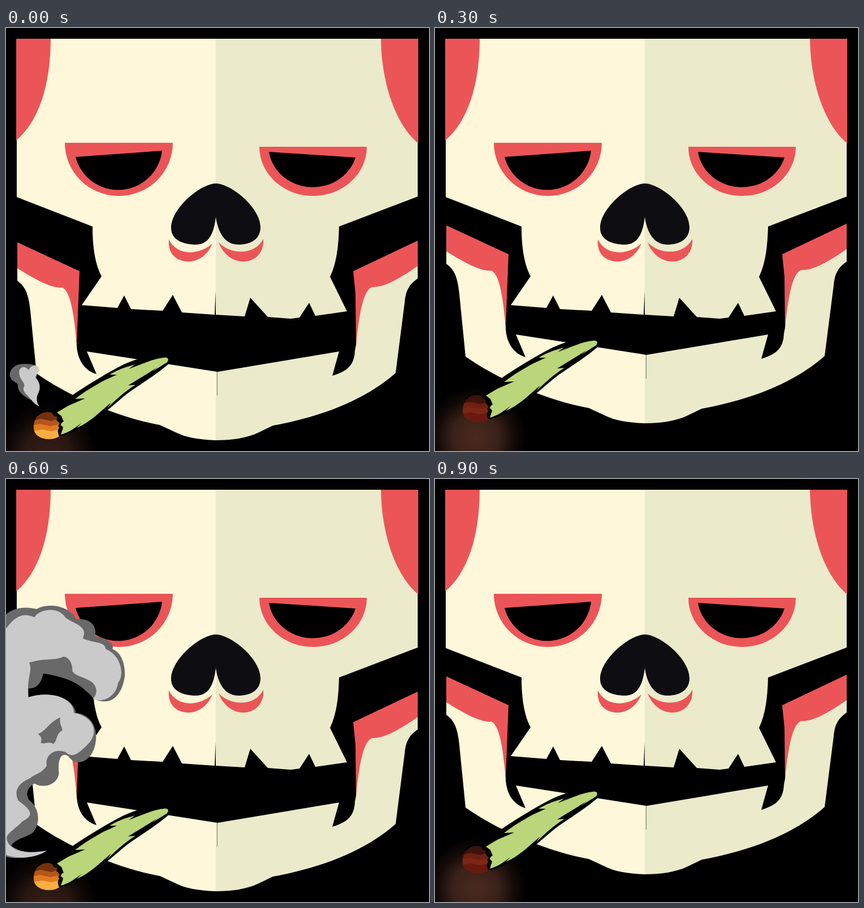
An HTML page that plays this animation: 748 by 748 pixels, repeating every 1000 ms.

```html
<!DOCTYPE html>
<html lang="en">
<head>
<meta charset="utf-8">
<title>Smoking skull</title>
<style>
  html, body { margin: 0; width: 100%; height: 100%; overflow: hidden; background: #000; }
  svg { display: block; width: 100%; height: 100%; }
  .cream { fill: url(#bone); }
  .red { fill: #eb5558; }
  .dark { fill: #696969; }
  .light { fill: #cacaca; }
</style>
</head>
<body>
<svg viewBox="0 0 748 748">
  <defs>
    <linearGradient id="bone" gradientUnits="userSpaceOnUse" x1="0" y1="0" x2="742" y2="0">
      <stop offset=".5" stop-color="#fef7d9"/>
      <stop offset=".5" stop-color="#ebeaca"/>
    </linearGradient>
    <radialGradient id="glow">
      <stop offset="0" stop-color="#4a2a20"/>
      <stop offset=".45" stop-color="#3a2119"/>
      <stop offset=".75" stop-color="#140b08"/>
      <stop offset="1" stop-color="#000"/>
    </radialGradient>
    <clipPath id="tip">
      <path d="M57 685C64 677 77 675 85 681L93 687 91 695 97 702 92 710 94 722C84 729 64 729 54 719 46 711 48 694 57 685Z"/>
    </clipPath>
    <g id="plume">
      <path class="dark" d="M0 311C12 300 30 299 45 303 60 294 92 296 104 318 122 316 135 326 131 343 146 346 160 352 157 362 172 368 176 388 175 402 172 425 160 440 145 439 125 438 128 430 118 424 105 410 82 402 55 398 52 412 46 420 33 420L33 433C70 422 100 436 103 456 125 458 136 478 132 500 128 526 105 538 92 520 80 512 76 528 78 545 76 562 55 568 42 560 30 566 27 580 38 588 50 600 50 620 40 632 30 640 12 642 8 652 25 664 45 664 60 659 45 670 15 672 0 668Z"/>
      <path class="light" d="M0 332C10 318 22 306 42 315 50 302 78 299 88 316 100 325 122 328 113 346 128 354 146 350 147 362 168 370 176 398 165 412 162 434 140 442 128 435 138 425 132 412 122 408 112 402 104 402 98 395 98 385 95 375 85 373 70 380 60 374 34 382 40 392 30 405 33 433 70 422 100 436 100 456 130 462 138 485 120 503 108 514 100 524 88 514 70 507 57 520 60 534 52 546 42 546 36 552 22 558 10 568 18 585 38 600 42 606 24 616 14 628 -3 634 2 645 8 660 30 664 60 659 45 670 15 672 0 665Z"/>
      <path class="dark" d="M47 487C58 484 66 467 80 463 78 472 83 476 83 482 74 486 76 496 70 502 63 497 58 503 51 500 54 494 51 490 47 487Z"/>
    </g>
  </defs>

  <rect width="748" height="748"/>

  <g id="jaw">
    <circle id="halo" cx="72" cy="754" r="90" fill="url(#glow)"/>
    <path class="cream" d="M20 395L118 440 125 560C126 585 137 605 160 612L143 572 374 608 589 572 577 615C602 607 616 598 617 570L619 560 624 440 728 395V443C712 454 707 465 705 485L689 610C640 653 570 685 472 703L445 716C425 725 400 729 371 729 340 728 315 723 300 715L272 702C200 689 112 652 54 611L43 500C40 470 34 457 20 447Z"/>
    <path d="M373.500 608V650" stroke="#77755f" fill="none"/>
    <path class="red" d="M20 379L130 430 125 560C121 515 116 468 100 459 78 461 45 440 20 425Z"/>
    <path class="red" d="M728 376L614 430 618 470 619 560C623 520 630 462 648 458 670 460 706 436 728 421Z"/>

    <path d="M54 685C60 675 70 676 80 675L100 662 122 646C148 629 180 609 208 595 236 583 262 576 282 576 293 576 295 585 290 592 272 608 250 622 228 637 207 650 188 671 166 686 142 701 120 717 96 722Z"/>
    <path fill="#bad57a" d="M90 680L110 668 140 655 122 656C140 642 158 632 172 624L196 613 183 613C197 605 207 601 218 598L228 595 217 603C238 595 262 584 279 583 288 582 288 587 285 591L258 608 268 600 216 632 229 631C208 644 196 656 179 672L186 662C166 679 149 697 125 707L134 698C124 706 110 716 97 719L101 706 95 700 102 696 98 686Z"/>
    <g clip-path="url(#tip)" id="ember">
      <rect x="45" y="670" width="60" height="60"/>
      <path d="M45 695L62 691 80 695 105 688V730H45Z"/>
      <path d="M45 703L60 700 78 704 105 699V730H45Z"/>
      <path d="M45 713L64 710 80 713 105 708V730H45Z"/>
    </g>
    <path d="M55 685Q67 674 82 679L86 685 92 686 91 693 97 698 94 704 99 709 93 713 95 721" fill="none" stroke="#000" stroke-width="3" stroke-linejoin="round"/>
  </g>

  <g id="skull">
    <path class="cream" d="M19 19H728V298L589 351C588 385 585 415 573 440L603 501 547 509 536 486 519 512 503 514 463 511 432 477 422 510 371 507 370.500 465 369 507 311 503 295 472 277 500 221 497 209 473 197 495 134 490 169 439C156 415 153 380 153 351L19 299Z"/>
    <path class="red" d="M18 19H79C79 100 58 165 18 199Z"/>
    <path class="red" d="M663 19H729V204C690 172 664 100 663 19Z"/>
    <path class="red" d="M104 203H295A95.500 94 0 0 1 104 203Z"/>
    <path d="M123 228L276 217A78 78 0 0 1 123 228Z"/>
    <path class="red" d="M448 210H638A95 87 0 0 1 448 210Z"/>
    <path d="M465 219L618 229A78.500 73 0 0 1 465 219Z"/>
    <path fill="#0e0e12" d="M371 275C345 275 292 318 292 354 292 374 312 383 336 383 359 383 368 362 371 334 375 362 387 383 411 383 432 383 450 374 450 352 450 318 398 275 371 275Z"/>
    <path class="red" d="M288 374C303 404 342 402 365 381 356 403 338 414 320 413 296 411 286 394 288 374Z"/>
    <path class="red" d="M376 379C398 402 440 402 455 373 457 396 441 413 420 413 399 413 383 398 376 379Z"/>
  </g>

  <g class="puff">
    <path class="dark" d="M30 594C12 594 3 610 8 618 12 628 22 625 21 634 22 646 34 652 44 658L50 640 57 600C50 594 40 594 30 594Z"/>
    <path class="light" d="M24 604C30 596 36 600 40 605 44 595 56 594 58 603 60 610 52 613 52 618 62 628 61 640 56 648 53 656 55 664 59 669 50 666 44 656 40 652 34 646 28 640 32 634 36 628 20 620 24 604Z"/>
  </g>
  <g class="puff">
    <path class="dark" d="M0 529C15 524 30 527 40 533 50 528 62 533 63 545 72 555 74 580 66 592 56 605 46 602 38 606 55 617 62 630 58 642L44 660C30 672 20 674 8 670L0 666V618C8 612 14 604 8 600L0 596Z"/>
    <path class="light" d="M8 550C12 540 30 538 34 548 36 538 48 530 58 536 66 542 62 552 62 552 72 560 74 585 64 594 54 604 44 600 37 604 35 612 44 612 52 620 60 630 56 640 49 646 46 656 54 664 63 666 52 668 40 664 34 656 24 650 10 650 8 640 10 630 22 628 20 616 16 606 0 604 0 598L0 572C6 566 10 560 8 550Z"/>
  </g>
  <g class="puff"><use href="#plume"/></g>
  <g class="puff"><use href="#plume" transform="translate(0 -133.600) scale(1.200)"/></g>
  <g class="puff"><use href="#plume" transform="translate(-12 -160)"/></g>
</svg>
<script>
  const STEP = 100, STEPS = 10, LIFT = 30;
  const HOT = ["#74300f", "#b4561a", "#df7a22", "#f8ae42"];
  const COLD = ["#3d130c", "#70200f", "#7c2716", "#69190f"];
  const jaw = document.getElementById("jaw");
  const halo = document.getElementById("halo");
  const bands = [...document.getElementById("ember").children];
  const puffs = document.querySelectorAll(".puff");
  let last = -1;

  // Even beats: mouth open, ember lit, next puff of smoke. Odd beats: mouth closed.
  function draw(time) {
    const beat = Math.floor(time / STEP) % STEPS;
    if (beat === last) return;
    last = beat;
    const open = beat % 2 === 0;
    const colors = open ? HOT : COLD;
    jaw.setAttribute("transform", `translate(0 ${open ? 0 : -LIFT})`);
    halo.setAttribute("opacity", open ? 0.7 : 1);
    bands.forEach((band, i) => band.setAttribute("fill", colors[i]));
    puffs.forEach((puff, i) => puff.setAttribute("display", i * 2 === beat ? "inline" : "none"));
  }

  const start = performance.now();
  function tick() {
    draw(performance.now() - start);
    requestAnimationFrame(tick);
  }
  draw(0);
  requestAnimationFrame(tick);
</script>
</body>
</html>
```
